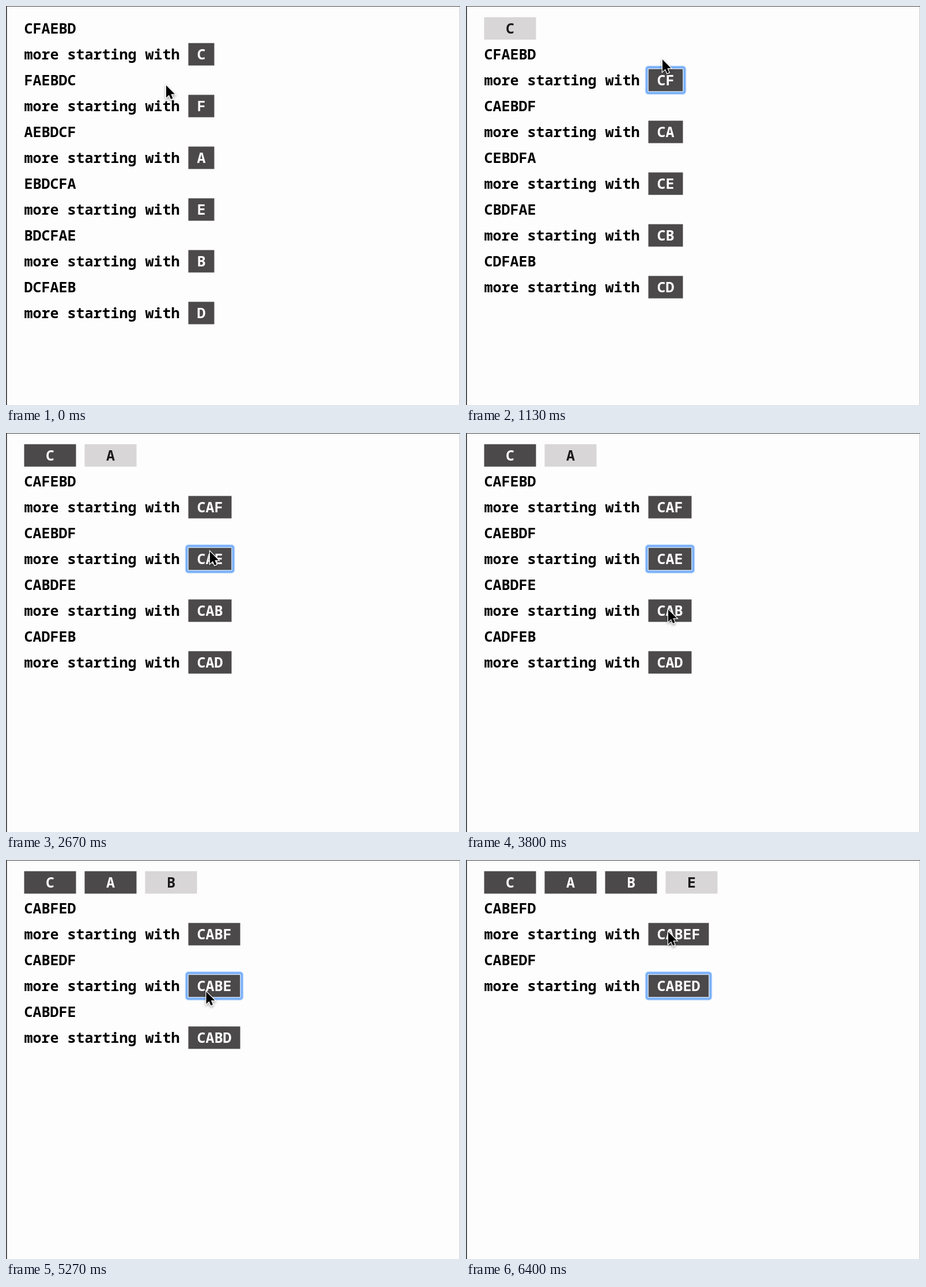
An HTML page with a canvas that plays this animation: 788x694 px, repeating every 6.59 s.

```html
<!DOCTYPE html>
<html lang="en">
<head>
<meta charset="utf-8">
<title>Permutation browser</title>
<style>
  html, body { margin: 0; width: 100%; height: 100%; overflow: hidden; background: #fdfdfd; }
  canvas { display: block; }
</style>
</head>
<body>
<canvas id="stage" width="788" height="694"></canvas>
<script>
const ctx = document.getElementById('stage').getContext('2d');
const LOOP = 6590, LETTERS = 'CFAEBD';
const LEFT = 31.5, CHAR = 15, ROW = 45, BASELINE = 48;
const DARK = '#4b494a', LIGHT = '#d8d6d7';

// [time, chosen prefix, index of the focused button]
const states = [
  [0, '', -1], [930, '', 0], [1070, 'C', 0], [1530, 'C', -1], [2400, 'C', 1],
  [2530, 'CA', 1], [4070, 'CA', 2], [4200, 'CAB', 2], [5270, 'CAB', 1], [5330, 'CABE', 1]
];

// [time, x, y] of the pointer tip
const path = [
  [0, 278, 138], [70, 278, 138], [870, 339, 86], [1130, 341, 93], [1330, 341, 94],
  [1800, 352, 143], [2400, 354, 204], [2670, 354, 206], [3500, 351, 307], [4610, 351, 307],
  [4930, 347.5, 229], [5800, 347.5, 229], [6400, 351, 125], [LOOP, 351, 125]
];

const arrow = new Path2D('M0 0V17L4 13.3L6.5 19.2L9.2 18L6.7 12.2H12Z');

function text(str, x, row, color = '#000') {
  ctx.fillStyle = color;
  ctx.fillText(str, x, BASELINE + row * ROW);
}

function box(x, row, width, color) {
  ctx.fillStyle = color;
  ctx.fillRect(x, 19.5 + row * ROW, width, 39);
}

function ring(x, row, width) {
  const y = 19.5 + row * ROW;
  for (const [gap, line, color] of [[3, 5.5, '#b9d6fc'], [2.6, 3.6, '#78aff8'], [0.5, 1, '#d3e5fc']]) {
    ctx.strokeStyle = color;
    ctx.lineWidth = line;
    ctx.beginPath();
    ctx.roundRect(x - gap, y - gap, width + 2 * gap, 39 + 2 * gap, gap);
    ctx.stroke();
  }
}

function drawList(prefix, focus) {
  [...prefix].forEach((letter, i) => {
    const x = LEFT + i * 105, current = i === prefix.length - 1;
    box(x, 0, 90, current ? LIGHT : DARK);
    text(letter, x + 37.5, 0, current ? '#1c1a1b' : '#fff');
  });
  const rest = [...LETTERS].filter(c => !prefix.includes(c)).join('');
  const buttonX = LEFT + 19 * CHAR, width = (prefix.length + 3) * CHAR;
  for (let i = 0; i < rest.length; i++) {
    const row = 2 * i + (prefix ? 1 : 0);
    text(prefix + rest.slice(i) + rest.slice(0, i), LEFT, row);
    text('more starting with', LEFT, row + 1);
    box(buttonX, row + 1, width, DARK);
    if (i === focus) ring(buttonX, row + 1, width);
    text(prefix + rest[i], buttonX + CHAR, row + 1, '#fff');
  }
}

function drawPointer(t) {
  const next = path.findIndex(p => p[0] > t);
  const [t0, x0, y0] = path[next - 1], [t1, x1, y1] = path[next];
  const u = (t - t0) / (t1 - t0), k = u * u * (3 - 2 * u);
  ctx.save();
  ctx.translate(x0 + (x1 - x0) * k, y0 + (y1 - y0) * k);
  ctx.scale(1.25, 1.25);
  ctx.save();
  ctx.shadowColor = 'rgba(0,0,0,.4)';
  ctx.shadowBlur = 4;
  ctx.shadowOffsetY = 2;
  ctx.strokeStyle = '#fff';
  ctx.lineWidth = 2;
  ctx.stroke(arrow);
  ctx.restore();
  ctx.fillStyle = '#000';
  ctx.fill(arrow);
  ctx.restore();
}

function draw(now) {
  const t = now % LOOP;
  ctx.fillStyle = '#fdfdfd';
  ctx.fillRect(0, 0, 788, 694);
  ctx.fillStyle = '#c9c9c9';
  ctx.fillRect(787, 0, 1, 694);
  ctx.fillStyle = '#222';
  ctx.fillRect(0, 0, 1.5, 694);
  ctx.fillStyle = '#444';
  ctx.fillRect(0, 0, 788, 1);
  ctx.font = '600 25px "Noto Sans Mono", monospace';
  const [, prefix, focus] = states.findLast(s => s[0] <= t);
  drawList(prefix, focus);
  drawPointer(t);
}

const start = performance.now();
function frame() {
  draw(performance.now() - start);
  requestAnimationFrame(frame);
}
frame();
</script>
</body>
</html>
```
